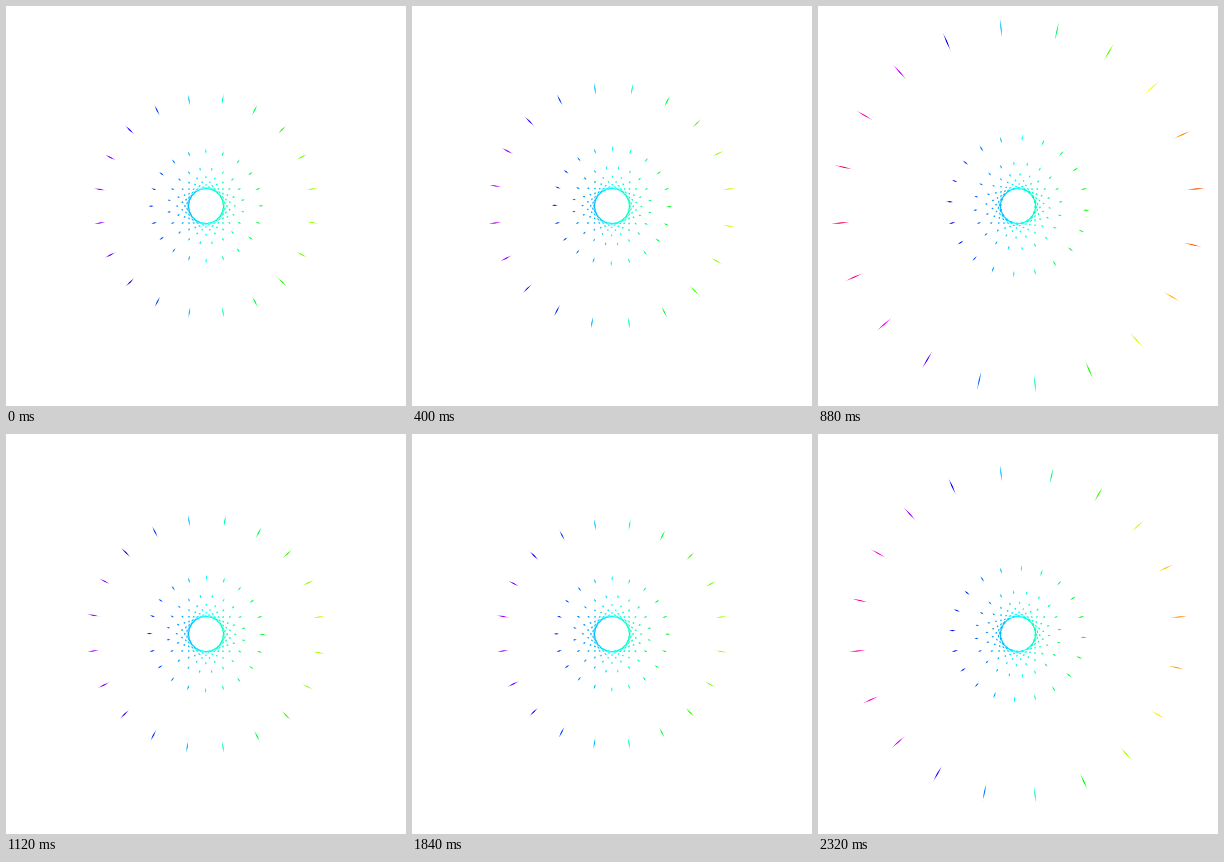
Recreate the animation shown at these times as an HTML page. Size 400x400 px, loop 2.4 s.

```html
<!DOCTYPE html>
<html lang="en">
<head>
<meta charset="utf-8">
<title>Crossing rays</title>
<style>
  html, body { margin: 0; width: 100%; height: 100%; overflow: hidden; background: #fff; }
  svg { display: block; width: 100vw; height: 100vh; }
</style>
</head>
<body>
<svg viewBox="0 0 400 400">
  <defs>
    <linearGradient id="rainbow" gradientUnits="userSpaceOnUse" x1="0" y1="0" x2="400" y2="0"></linearGradient>
    <clipPath id="still"><path id="stillRays" transform="translate(200 200)"/></clipPath>
    <clipPath id="turning"><path id="turningRays"/></clipPath>
  </defs>
  <g clip-path="url(#turning)">
    <rect width="400" height="400" fill="url(#rainbow)" clip-path="url(#still)"/>
  </g>
</svg>
<script>
const LOOP = 2400, STEP = 80;
const RAYS = 20, RADIUS = 17, WIDTH = 1.5, LENGTH = 200;
const START = -0.2, TURN = 3.935; // degrees, degrees per step
const byId = id => document.getElementById(id);

// Thin strips tangent to the inner circle; side picks the winding sense.
function pinwheel(side) {
  const inner = side * (RADIUS - WIDTH / 2);
  const outer = side * (RADIUS + WIDTH / 2);
  const corners = [[inner, 0], [outer, 0], [outer, -LENGTH], [inner, -LENGTH]];
  let d = '';
  for (let i = 0; i < RAYS; i++) {
    const a = i * 2 * Math.PI / RAYS, c = Math.cos(a), s = Math.sin(a);
    const points = corners.map(([x, y]) =>
      (x * c - y * s).toFixed(3) + ' ' + (x * s + y * c).toFixed(3));
    d += 'M' + points.join('L') + 'Z';
  }
  return d;
}

['#f00', '#f0f', '#00f', '#0ff', '#0f0', '#ff0', '#f00'].forEach((color, i) => {
  const stop = document.createElementNS('http://www.w3.org/2000/svg', 'stop');
  stop.setAttribute('offset', i / 6);
  stop.setAttribute('stop-color', color);
  byId('rainbow').append(stop);
});

byId('stillRays').setAttribute('d', pinwheel(-1));
byId('turningRays').setAttribute('d', pinwheel(1));

function draw(now) {
  const step = Math.floor((now % LOOP) / STEP);
  const angle = START + TURN * step;
  byId('turningRays').setAttribute('transform', `translate(200 200) rotate(${angle})`);
}

const begin = performance.now();
function tick() {
  draw(performance.now() - begin);
  requestAnimationFrame(tick);
}
tick();
</script>
</body>
</html>
```
